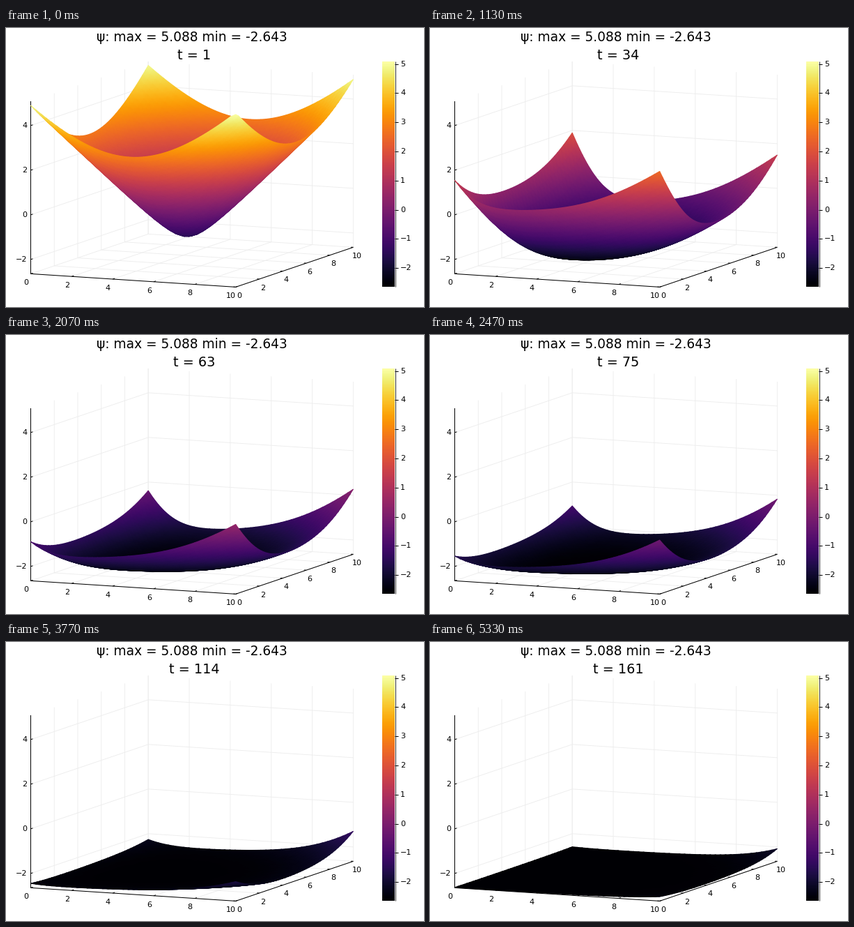
A matplotlib script for the animation above (5.36 s loop, 600 px wide and 400 px high).

```python
import numpy as np
import matplotlib.pyplot as plt
from matplotlib.animation import FuncAnimation

plt.rcParams["font.family"] = "DejaVu Sans"
FRAMES, LOOP = 161, 5360
ZMIN, ZMAX = -2.643, 5.088
DPI = 100
PX = 72 / DPI  # points per pixel


def project(x, y, z):
    """Box coordinates to stage pixels (parallel projection)."""
    return (35.5 + 29.42 * x + 16.87 * y,
            352.4 + 1.9 * x - 5.7 * y - 32 * (z - ZMIN))


# Far rows come first, so near cells are painted over them
span = np.linspace(0, 10, 41)
X, Y = np.meshgrid(span, span[::-1])
U, V = X / 10, Y / 10

# The height over the floor is SOFT * log(1 + e). Each point's e runs from the
# cone to the basin until T_BASIN and then decays exponentially.
SOFT, T_BASIN = 2.6, 18


def cone():
    bowl = 1.04 * np.sqrt((X - 4.82) ** 2 + (Y - 4.92) ** 2 + 0.85 ** 2) - 2.42
    tilt = 0.1 * (1 - V) - 0.3 * U * V
    return np.expm1((bowl + tilt - ZMIN) / SOFT)


def basin():
    left, right = (1 - U) ** 12, U ** 4
    front, back = (1 - V) ** 7, V ** 5
    walls = 4.4 * left + 1.85 * right + 4.5 * front + 1.6 * back
    corners = 4.8 * right * front + 2.2 * right * back + 3.4 * left * back
    return np.maximum(walls + corners - 0.1, 0.003)


LOG_CONE, LOG_BASIN = np.log(cone()), np.log(basin())
DECAY = (0.128 - 0.038 * U - 0.018 * V - 0.015 * U * V) / SOFT
PIT = 2.5 * np.exp(-((X - 4.3) ** 2 + (Y - 4.4) ** 2) / 3)


def height(t):
    if t < T_BASIN:
        s = (t - 1) / (T_BASIN - 1)
        log_e = (1 - s) * LOG_CONE + s * LOG_BASIN - PIT * np.sin(np.pi * s)
    else:
        log_e = LOG_BASIN - DECAY * (t - T_BASIN)
    return np.minimum(ZMIN + SOFT * np.log1p(np.exp(log_e)), ZMAX)


fig = plt.figure(figsize=(6, 4), dpi=DPI, facecolor="white")
ax = fig.add_axes([0, 0, 1, 1])
ax.axis("off")


def line(points, color="black", width=1.0, z=1):
    px, py = zip(*points)
    ax.plot(px, py, color=color, lw=width * PX, zorder=z, solid_capstyle="butt")


def label(x, y, s, size=11.1, **kw):
    kw = {"ha": "center", "va": "center", **kw}
    return ax.text(x, y, s, fontsize=size * PX, color="black", zorder=5, **kw)


def number(v):
    return str(v).replace("-", "\u2212")


def grid(*corners):
    line([project(*c) for c in corners], "#ededed", 0.9, 0.5)


# Grid on the floor and the two back walls
for v in range(0, 11, 2):
    grid((v, 0, ZMIN), (v, 10, ZMIN), (v, 10, ZMAX))
    grid((10, v, ZMIN), (0, v, ZMIN), (0, v, ZMAX))
for v in range(-2, 5, 2):
    grid((0, 0, v), (0, 10, v), (10, 10, v))

# Axes, ticks and tick labels
line([project(0, 0, ZMAX), project(0, 0, ZMIN), project(10, 0, ZMIN),
      project(10, 10, ZMIN)])
for v in range(0, 11, 2):
    px, py = project(v, 0, ZMIN)
    line([(px, py), (px + 3, py - 1)])
    label(px - 6.7, py + 12.8, number(v))
    px, py = project(10, v, ZMIN)
    line([(px, py), (px - 3.2, py - 0.2)])
    label(px + 5.2, py + 12.6, number(v))
for v in range(-2, 5, 2):
    px, py = project(0, 0, v)
    line([(px, py), (px + 3, py - 1)])
    label(30.5, py + 0.2, number(v), ha="right")

# Colour bar
TOP, BOTTOM = 48, 371
ax.imshow(np.linspace(ZMAX, ZMIN, BOTTOM - TOP)[:, None], cmap="inferno",
          aspect="auto", extent=(540, 558, BOTTOM, TOP),
          vmin=ZMIN, vmax=ZMAX, zorder=1)
line([(558.5, TOP), (558.5, BOTTOM)], width=0.8, z=2)
for v in range(-2, 6):
    py = TOP + (ZMAX - v) / (ZMAX - ZMIN) * (BOTTOM - TOP)
    line([(558, py), (563, py)], z=2)
    label(566, py, number(v), ha="left")

ax.set_xlim(0, 600)
ax.set_ylim(400, 0)

label(267, 19, f"\u03c8: max = {ZMAX} min = {ZMIN}", 18.6, va="baseline")
clock = label(270.4, 45, "t = 1", 19.3, va="baseline")
mesh = None


def update(i):
    global mesh
    if mesh is not None:
        mesh.remove()
    t = i + 1
    z = height(t)
    px, py = project(X, Y, z)
    mesh = ax.pcolormesh(px, py, z, shading="gouraud", cmap="inferno",
                         vmin=ZMIN, vmax=ZMAX, zorder=3)
    clock.set_text(f"t = {t}")
    return mesh, clock


anim = FuncAnimation(fig, update, frames=FRAMES, interval=LOOP / FRAMES,
                     repeat=True, repeat_delay=0, blit=False)
plt.show()
```
